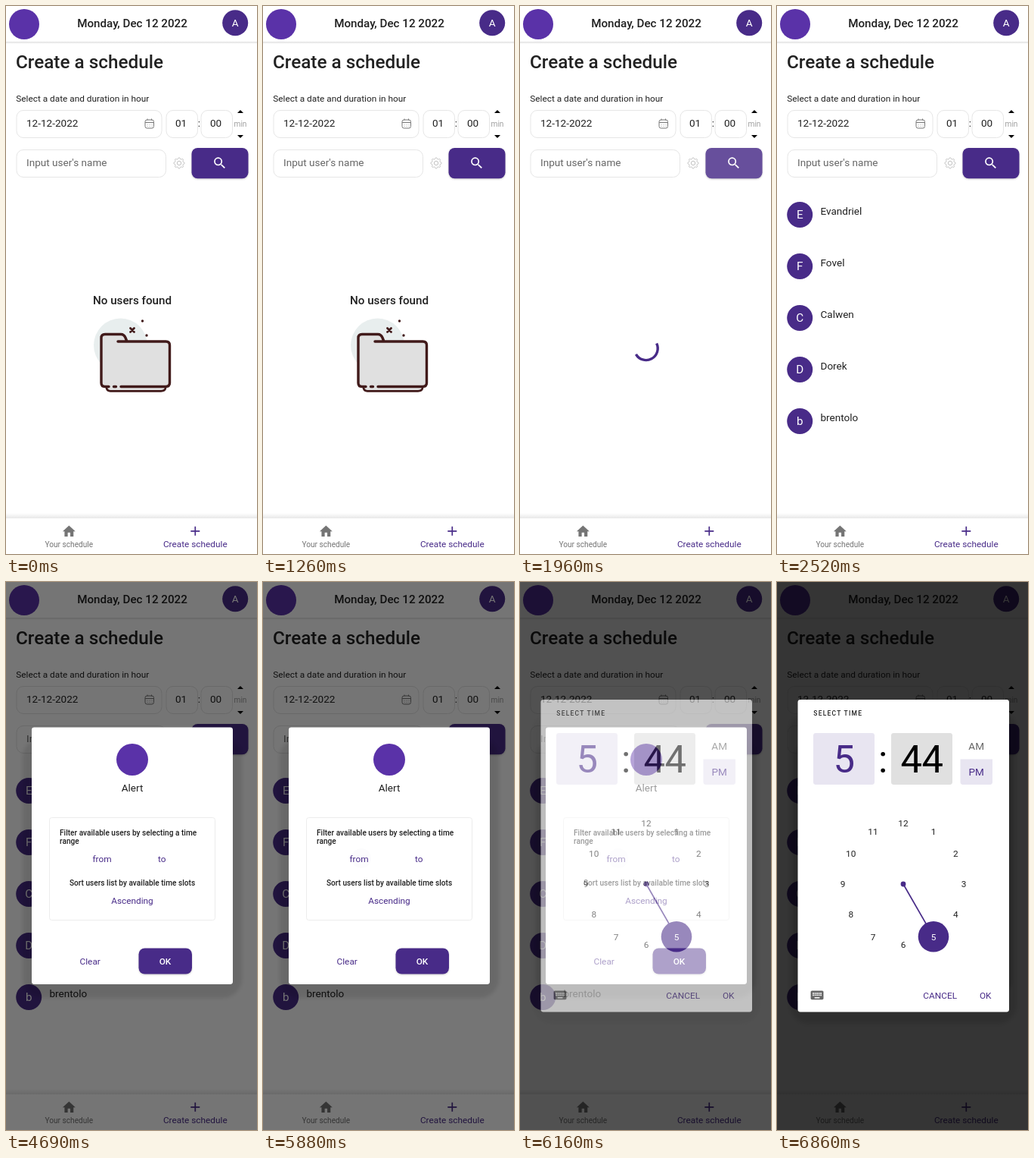
Write an HTML page that moves like this. It is 332 px wide and 722 px high and loops after 8 s.

```html
<!DOCTYPE html>
<html lang="en">
<head>
<meta charset="utf-8">
<title>Create a schedule</title>
<style>
  html, body { margin: 0; width: 100%; height: 100%; overflow: hidden; background: #fff; }
  svg { display: block; width: 100%; height: 100%; }
  text { font: 400 11.84px Roboto, sans-serif; fill: #212121; white-space: pre; }
  .mid { text-anchor: middle; }
  .medium { font-weight: 500; }
  .body { font-size: 13.55px; }
  .large { font-size: 15.2px; }
  .small { font-size: 10.15px; }
  .brand { fill: #482b88; }
  .white { fill: #fff; }
  .grey { fill: #757575; }
  .logo { fill: #5a32a8; }
  .field { fill: #fff; stroke: #e6e6e6; }
  .digits { font-size: 50.7px; letter-spacing: -.4px; }
  .raised { filter: drop-shadow(0 1px 1px rgba(0, 0, 0, .2)); }
  .outline { fill: none; stroke: #411a1a; stroke-width: 3.4; stroke-linecap: round; stroke-linejoin: round; }
</style>
</head>
<body>
<svg viewBox="0 0 332 722">
  <defs>
    <linearGradient id="shade" x2="0" y2="1">
      <stop stop-color="#000" stop-opacity=".13"/>
      <stop offset="1" stop-color="#000" stop-opacity="0"/>
    </linearGradient>
    <filter id="soft" x="-20%" y="-20%" width="140%" height="140%"><feGaussianBlur stdDeviation="2.5"/></filter>
  </defs>

  <rect width="332" height="722" fill="#fff"/>

  <!-- Header -->
  <rect y="47" width="332" height="3" fill="url(#shade)"/>
  <circle class="logo" cx="24" cy="24" r="20"/>
  <text class="mid medium large" x="167" y="28.2">Monday, Dec 12 2022</text>
  <circle class="brand" cx="303.2" cy="22.2" r="17"/>
  <text class="mid body white" x="303.2" y="27">A</text>

  <!-- Form -->
  <text class="medium" x="13" y="82.3" style="font-size:24.3px">Create a schedule</text>
  <text x="13.3" y="126.4">Select a date and duration in hour</text>
  <rect class="field" x="14" y="137.5" width="192" height="36" rx="9"/>
  <rect class="field" x="212" y="137.5" width="41.5" height="36" rx="9"/>
  <rect class="field" x="258" y="137.5" width="41.5" height="36" rx="9"/>
  <text class="body" x="27" y="159.2">12-12-2022</text>
  <text class="mid body" x="231.5" y="159.2">01</text>
  <text class="mid body" x="255.5" y="159.2">:</text>
  <text class="mid body" x="277.5" y="159.2">00</text>
  <text class="mid small" x="310" y="159" style="fill:#9e9e9e">min</text>
  <path d="M306 141h8l-4-4zM306 170h8l-4 4z"/>
  <g fill="none" stroke="#777">
    <rect x="184" y="150" width="11.5" height="11" rx="2.5"/>
    <path d="M184 153.5h11.5M187 148.5v2M192.500 148.5v2"/>
    <path d="M186.5 156.2h7.5M186.5 158.6h7.5" stroke-dasharray="1.4 1.6" opacity=".45"/>
  </g>
  <rect class="field" x="14" y="189.5" width="197.5" height="36" rx="9"/>
  <text class="body" x="27" y="211.2" style="fill:#666">Input user's name</text>
  <g fill="none" stroke="#c2c2c2">
    <path id="gear"/>
    <circle cx="229" cy="207" r="2.7"/>
  </g>
  <g class="raised">
    <rect class="brand" x="245.5" y="187" width="75" height="40.300" rx="8"/>
    <rect id="searchInk" class="white" x="245.5" y="187" width="75" height="40.300" rx="8" opacity="0"/>
  </g>
  <path class="white" transform="translate(272.6 196.8) scale(.845)" d="M15.5 14h-.79l-.28-.27A6.47 6.47 0 0 0 16 9.5 6.5 6.5 0 1 0 9.5 16c1.61 0 3.09-.59 4.23-1.57l.27.28v.79l5 4.99L20.49 19zm-6 0a4.5 4.5 0 1 1 0-9 4.5 4.5 0 0 1 0 9z"/>

  <!-- Empty state -->
  <g id="empty">
    <text class="mid medium large" x="167" y="393">No users found</text>
    <circle cx="151.5" cy="447" r="35.5" fill="#e8eeee"/>
    <path d="M126 437q0-5 5-5h21q4 0 6 5l2 5h51q5 0 5 5v49q0 5-5 5l-3 6h-72l-5-6q-5 0-5-5z" fill="#e0e0e0"/>
    <path class="outline" d="M152 501.5H211q5.5 0 5.5-5V447q0-5-5-5H148M160 442l-2-5q-2-4.5-6-4.5H131q-5 0-5 5V496.5q0 5 5 5h5M142.5 501.5h3"/>
    <path class="outline" d="M133 503.5q1 3.8 5 3.8h67q5 0 6-3.8" style="stroke-width:2.8"/>
    <path class="outline" d="M164.5 424.5l5 5m0-5l-5 5" style="stroke-width:2.8"/>
    <circle cx="180.5" cy="415" r="1.7" fill="#411a1a"/>
    <circle cx="186" cy="434" r="1.7" fill="#411a1a"/>
  </g>

  <path id="spinner" fill="none" stroke="#482b88" stroke-width="3.4"/>
  <g id="users"></g>

  <!-- Navigation -->
  <rect y="668" width="332" height="7" fill="url(#shade)" transform="matrix(1 0 0 -1 0 1343)" opacity=".7"/>
  <path class="grey" transform="translate(73.2 682) scale(.845)" d="M10 20v-6h4v6h5v-8h3L12 3 2 12h3v8z"/>
  <text class="mid small grey" x="83.3" y="713.4">Your schedule</text>
  <path d="M244.3 691.8h12M250.3 685.8v12" stroke="#482b88" stroke-width="1.7"/>
  <text class="mid brand" x="250.3" y="713.2">Create schedule</text>

  <!-- Filter dialog -->
  <g id="alert">
    <rect width="332" height="722" opacity=".54"/>
    <rect x="22" y="206" width="290" height="342" rx="26" opacity=".1" filter="url(#soft)"/>
    <rect class="white" x="34" y="191.5" width="266" height="338.5" rx="3.4"/>
    <circle class="logo" cx="167" cy="234" r="21"/>
    <text class="mid body" x="167" y="276.2">Alert</text>
    <rect x="57.5" y="310.5" width="219" height="135" rx="3" fill="#fff" stroke="#ececec"/>
    <text class="small medium" x="71" y="333.5">Filter available users by selecting a time</text>
    <text class="small medium" x="71" y="345.4">range</text>
    <circle id="fromInk" class="brand" cx="130" cy="364" r="13"/>
    <text class="mid brand" x="127" y="369.2">from</text>
    <text class="mid brand" x="206.3" y="369.2">to</text>
    <text class="mid small medium" x="167" y="399.8">Sort users list by available time slots</text>
    <text class="mid brand" x="167" y="423.8">Ascending</text>
    <text class="mid brand" x="111.2" y="503.8">Clear</text>
    <rect class="brand raised" x="175.5" y="482.5" width="70.5" height="34" rx="8"/>
    <text class="mid medium white" x="210.5" y="503.8">OK</text>
  </g>

  <!-- Time picker -->
  <g id="picker">
    <rect width="332" height="722" opacity=".54"/>
    <rect x="17" y="170" width="300" height="412" rx="26" opacity=".1" filter="url(#soft)"/>
    <rect class="white" x="27.5" y="155" width="279.5" height="411.5" rx="3.4"/>
    <text class="medium" x="48.3" y="176.2" style="font-size:8.45px;letter-spacing:1.27px">SELECT TIME</text>
    <rect x="48" y="199" width="81" height="68" rx="3.4" fill="#e8e5f1"/>
    <rect x="151" y="199" width="81" height="68" rx="3.4" fill="#e0e0e0"/>
    <path d="M242.5 233.5h42.5v30q0 3.4-3.4 3.4h-35.7q-3.4 0-3.4-3.4z" fill="#e8e5f1"/>
    <text class="mid digits brand" x="88.5" y="250.5">5</text>
    <text class="mid digits" x="140" y="250.5" style="fill:#000">:</text>
    <text class="mid digits" x="191.5" y="250.5" style="fill:#000">44</text>
    <text class="mid body" x="263.7" y="220.8" style="fill:#666">AM</text>
    <text class="mid body brand" x="263.7" y="255">PM</text>
    <path d="M167 398l40 69.3" stroke="#482b88" stroke-width="1.7"/>
    <circle class="brand" cx="167" cy="398" r="3.4"/>
    <circle class="brand" cx="207" cy="467.3" r="20.3"/>
    <g id="dial"></g>
    <path fill="#666" transform="translate(42.9 534.2) scale(.845)" d="M20 5H4c-1.1 0-2 .9-2 2v10c0 1.1.9 2 2 2h16c1.1 0 2-.9 2-2V7c0-1.1-.9-2-2-2zm-9 3h2v2h-2V8zm0 3h2v2h-2v-2zM8 8h2v2H8V8zm0 3h2v2H8v-2zm-1 2H5v-2h2v2zm0-3H5V8h2v2zm9 7H8v-2h8v2zm0-4h-2v-2h2v2zm0-3h-2V8h2v2zm3 3h-2v-2h2v2zm0-3h-2V8h2v2z"/>
    <text class="mid brand" x="215.7" y="549">CANCEL</text>
    <text class="mid brand" x="275.7" y="549">OK</text>
  </g>
</svg>

<script>
const LOOP = 8000, STEP = 70;
const TAP = 1680, LOADING = 1750, SETTLED = 2170, LOADED = 2310, ALERT = 4690, FROM_TAP = 5880, PICKER = 6090;
const el = id => document.getElementById(id);
const show = (id, visible) => { el(id).style.display = visible ? '' : 'none'; };
const clamp = x => Math.min(1, Math.max(0, x));
const polar = (cx, cy, r, a) => `${(cx + r * Math.cos(a)).toFixed(2)} ${(cy + r * Math.sin(a)).toFixed(2)}`;

// cubic-bezier(.4, 0, .2, 1)
function fastOutSlowIn(x) {
  let lo = 0, hi = 1;
  for (let i = 0; i < 20; i++) {
    const s = (lo + hi) / 2;
    if (1.2 * s * (1 - s) ** 2 + .6 * s * s * (1 - s) + s ** 3 < x) lo = s; else hi = s;
  }
  return 3 * lo * lo * (1 - lo) + lo ** 3;
}

el('users').innerHTML = ['Evandriel', 'Fovel', 'Calwen', 'Dorek', 'brentolo'].map((name, i) => {
  const y = 275 + 68 * i;
  return `<circle class="brand" cx="30.2" cy="${y}" r="17"/>
    <text class="mid large white" x="30.2" y="${y + 5.3}">${name[0]}</text>
    <text class="body" x="57.5" y="${y - .2}">${name}</text>`;
}).join('');

el('dial').innerHTML = Array.from({ length: 12 }, (_, i) => {
  const hour = i + 1, [x, y] = polar(167, 402.3, 80, (hour - 3) * Math.PI / 6).split(' ');
  return `<text class="mid${hour === 5 ? ' white' : ''}" x="${x}" y="${y}">${hour}</text>`;
}).join('');

el('gear').setAttribute('d', 'M' + Array.from({ length: 64 }, (_, i) => {
  const a = i * Math.PI / 32;
  return polar(229, 207, 6.3 + Math.cos(8 * a), a);
}).join('L') + 'z');

function spinnerPath(ms) {
  const sweep = fastOutSlowIn(clamp(ms / 666.5)) * 1.5 * Math.PI;
  const start = -Math.PI / 2 + ms / 2222 * 2 * Math.PI + ms / 1333 * Math.PI / 2;
  const point = a => polar(166.8, 451.2, 15.4, a);
  return `M${point(start)}A15.4 15.4 0 ${sweep > Math.PI ? 1 : 0} 1 ${point(start + sweep)}`;
}

function render(time) {
  const t = Math.floor(time / STEP) * STEP;
  const loading = t >= LOADING && t < LOADED;
  show('empty', t < LOADING);
  show('spinner', loading);
  show('users', t >= LOADED);
  show('alert', t >= ALERT);
  show('picker', t > PICKER);

  if (loading) el('spinner').setAttribute('d', spinnerPath(Math.min(t, SETTLED) - TAP));
  const ink = Math.min(clamp((t - TAP + STEP) / 210), clamp((SETTLED - t) / 210));
  el('searchInk').setAttribute('opacity', .17 * ink);
  el('fromInk').setAttribute('opacity', t >= FROM_TAP ? .015 : 0);
  el('picker').setAttribute('opacity', 1 - (1 - clamp((t - PICKER) / 210)) ** 2);
}

const began = performance.now();
function tick() {
  render((performance.now() - began) % LOOP);
  requestAnimationFrame(tick);
}
tick();
</script>
</body>
</html>
```
